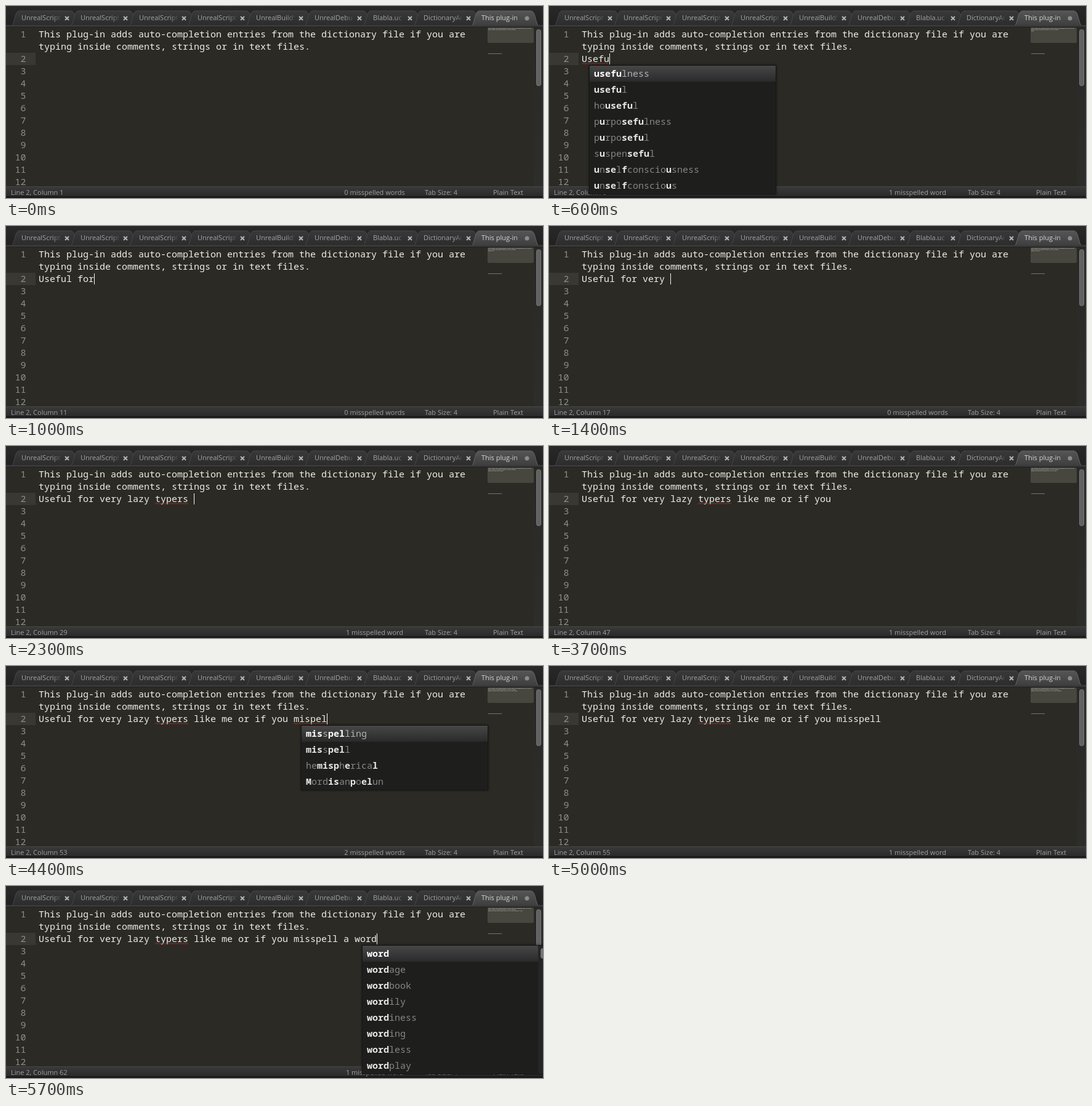
An HTML page with a canvas that plays this animation: 872 px wide and 312 px high, repeating every 5.8 s.

```html
<!DOCTYPE html>
<html lang="en">
<head>
<meta charset="utf-8">
<title>Dictionary completion</title>
<style>
html, body { margin: 0; width: 100%; height: 100%; overflow: hidden; background: #2b2a25; }
canvas { display: block; width: 872px; height: 312px; }
</style>
</head>
<body>
<canvas id="stage" width="872" height="312"></canvas>
<script>
const g = document.getElementById('stage').getContext('2d');
const W = 872, H = 312, LOOP = 5800, STEP = 100;
const CW = 9, LEFT = 53, ROW = 20;
const CODE = '15px "Noto Sans Mono", "DejaVu Sans Mono", monospace';
const UI = '11px "Open Sans", "Noto Sans", sans-serif';

const intro = [
  'This plug-in adds auto-completion entries from the dictionary file if you are',
  'typing inside comments, strings or in text files.'
];
const start = 'Useful for very lazy typers like me or if you ';
const typo = start + 'mispel';
const fixed = start + 'misspell a word';

// [step, typed length], typed evenly in between
const keys = [[1, 0], [6, 5], [14, 16], [15, 16], [23, 28], [24, 28], [35, 46], [38, 46], [44, 52]];
const fixKeys = [[47, 54], [49, 54], [57, 61]];

// Letters between asterisks are the matched ones
const lists = {
  Usefu: ['*usefu*lness', '*usefu*l', 'ho*usefu*l', 'p*u*rpo*sefu*lness', 'p*u*rpo*sefu*l',
    's*u*spen*sefu*l', '*u*n*se*l*f*conscio*u*sness', '*u*n*se*l*f*conscio*u*s'],
  mispel: ['*mis*s*pel*ling', '*mis*s*pel*l', 'he*misp*h*e*rica*l*', '*M*ord*is*an*p*o*el*un'],
  word: ['*word*', '*word*age', '*word*book', '*word*ily', '*word*iness', '*word*ing', '*word*less', '*word*play']
};
const unknown = /\b(Usefu?|ver|laz|typ|typers?|misp|mispel?)\b/g;

// [label, text x, close x]
const tabs = [
  ['UnrealScriptA', 25, 99], ['UnrealScriptB', 121, 194], ['UnrealScriptC', 216, 289],
  ['UnrealScriptD', 311, 384], ['UnrealBuildSy', 406, 479], ['UnrealDebugger', 501, 574],
  ['Blabla.uc', 596, 656], ['DictionaryAuto', 678, 751], ['This plug-in', 772, 846]
];

function vGrad(y0, y1, ...colors) {
  const p = g.createLinearGradient(0, y0, 0, y1);
  colors.forEach((c, i) => p.addColorStop(i / (colors.length - 1), c));
  return p;
}

function box(x, y, w, h, fill) {
  g.fillStyle = fill;
  g.fillRect(x, y, w, h);
}

function pill(x, y, w, h, r, fill) {
  g.fillStyle = fill;
  g.beginPath();
  g.roundRect(x, y, w, h, r);
  g.fill();
}

function text(s, x, y, fill, font = CODE, align = 'left') {
  g.font = font;
  g.textAlign = align;
  g.fillStyle = fill;
  g.fillText(s, x, y);
}

function lengthAt(list, n) {
  if (n <= list[0][0]) return list[0][1];
  for (let i = 1; i < list.length; i++) {
    const [a, from] = list[i - 1], [b, to] = list[i];
    if (n <= b) return from + Math.floor((to - from) * (n - a) / (b - a));
  }
  return list[list.length - 1][1];
}

function typed(n) {
  if (n < 0) return '';
  return n < 47 ? typo.slice(0, lengthAt(keys, n)) : fixed.slice(0, lengthAt(fixKeys, n));
}

function drawTab([label, x, close], active) {
  const l = x - 17, r = close + 20;
  g.beginPath();
  g.moveTo(l, 33);
  g.bezierCurveTo(l + 7, 30, l + 5, 8, l + 14, 8);
  g.lineTo(r - 14, 8);
  g.bezierCurveTo(r - 5, 8, r - 7, 30, r, 33);
  g.fillStyle = active ? vGrad(8, 33, '#555555', '#3d3d3d') : vGrad(8, 33, '#393939', '#2b2b2b');
  g.fill();
  g.strokeStyle = active ? '#666666' : '#484848';
  g.lineWidth = 1;
  g.stroke();

  const end = close - 11, color = active ? '#d6d6d6' : '#a2a2a2';
  const fade = g.createLinearGradient(end - 12, 0, end, 0);
  fade.addColorStop(0, color);
  fade.addColorStop(1, active ? '#b0b0b0' : '#a2a2a230');
  g.save();
  g.beginPath();
  g.rect(x - 1, 8, end - x + 1, 24);
  g.clip();
  text(label, x, 23, fade, UI);
  g.restore();

  if (active) {
    pill(close - 3.5, 16.5, 7, 7, 3.5, '#8b8b8b');
  } else {
    g.strokeStyle = '#b4b4b4';
    g.lineWidth = 2;
    g.beginPath();
    g.moveTo(close - 3, 17);
    g.lineTo(close + 3, 23);
    g.moveTo(close + 3, 17);
    g.lineTo(close - 3, 23);
    g.stroke();
  }
}

function drawTabs() {
  box(0, 0, W, 35, vGrad(0, 34, '#292929', '#202020'));
  tabs.forEach((t, i) => drawTab(t, i === tabs.length - 1));
  box(0, 31, W, 3, '#3b3b3b');
  box(0, 33, W, 1, '#323232');
  box(0, 34, W, 1, '#222220');
}

function miniLine(s, y) {
  g.fillStyle = 'rgba(205,205,195,.5)';
  [...s].forEach((c, i) => { if (c !== ' ') g.fillRect(783 + i * 0.91, y, 0.91, 1); });
}

function drawMinimap(line) {
  pill(782, 35, 75, 25, 2, '#47473f');
  miniLine(intro[0], 36);
  miniLine(intro[1], 38);
  miniLine(line, 40);
  box(783, 77, 22, 1, '#75756b');
  box(857, 35, 15, 258, vGrad(35, 293, '#292927', '#2d2d2b'));
  pill(861, 38, 8, 92, 4, '#777777');
  pill(862, 39, 6, 90, 3, '#616161');
}

function squiggle(x, w) {
  g.strokeStyle = '#d02020';
  g.lineWidth = 1;
  g.beginPath();
  g.moveTo(x, 94.5);
  for (let i = 2; i <= w; i += 2) g.lineTo(x + i, i % 4 ? 92.5 : 94.5);
  g.stroke();
}

function drawEditor(line, caret) {
  box(0, 35, W, 258, '#2b2a25');
  box(0, 76, 48, ROW, '#393833');
  text('1', 32.5, 51, '#8f908a', CODE, 'right');
  for (let n = 2; n <= 12; n++) text(n, 32.5, 91 + (n - 2) * ROW, '#8f908a', CODE, 'right');
  intro.forEach((s, i) => text(s, LEFT, 51 + i * ROW, '#eeeee6'));
  text(line, LEFT, 91, '#eeeee6');
  for (const m of line.matchAll(unknown)) squiggle(LEFT + m.index * CW, m[0].length * CW);
  if (caret) box(LEFT + line.length * CW, 77, 1, 18, '#f8f8f0');
}

function drawStatus(line) {
  const bad = [...line.matchAll(unknown)].length;
  box(0, 293, W, 19, vGrad(293, 310, '#3a3a3a', '#292929'));
  box(0, 293, W, 1, '#454545');
  box(0, 309, W, 3, '#1c1a1a');
  const label = (s, x, align) => text(s, x, 307, '#a0a0a0', UI, align);
  label('Line 2, Column ' + (line.length + 1), 8);
  label(bad + ' misspelled word' + (bad === 1 ? '' : 's'), 598.5, 'center');
  label('Tab Size: 4', 680);
  label('Plain Text', 791);
}

function drawItem(item, x, y, count, first) {
  let left = count;
  item.split('*').forEach((part, i) => {
    [...part].forEach(c => {
      const hit = i % 2 === 1 && left-- > 0;
      const color = first ? (hit ? '#ffffff' : '#b2b2b2') : (hit ? '#e6e6e6' : '#868686');
      text(c, x, y, color, hit ? 'bold ' + CODE : CODE);
      x += CW;
    });
  });
}

function drawPopup(line) {
  const word = line.slice(line.lastIndexOf(' ') + 1);
  if (word.length < 3) return;
  const key = Object.keys(lists).find(k => k.startsWith(word));
  if (!key) return;
  const items = lists[key], scroll = key === 'word';
  const x = LEFT + (line.length - word.length) * CW + 13;
  const w = 302, h = items.length * 26 + 2;
  g.save();
  g.shadowColor = 'rgba(0,0,0,.55)';
  g.shadowBlur = 4;
  box(x - 1, 96, w + 2, h, '#151515');
  g.restore();
  box(x, 97, w, h - 2, '#1e1f1d');
  const rowW = scroll ? 285 : w;
  box(x, 97, rowW, 26, vGrad(97, 123, '#464746', '#292a29'));
  if (scroll) {
    box(x + rowW, 97, w - rowW, h - 2, '#252525');
    pill(868, 101, 8, 17, 4, '#747474');
  }
  items.forEach((s, i) => drawItem(s, x + 7, 115 + i * 26, word.length, i === 0));
}

function draw(ms) {
  const n = Math.floor((ms % LOOP) / STEP), line = typed(n);
  const caret = n > 1 && (line !== typed(n - 1) || line !== typed(n - 2));
  g.clearRect(0, 0, W, H);
  drawEditor(line, caret);
  drawMinimap(line);
  drawTabs();
  drawStatus(line);
  drawPopup(line);
}

const begin = performance.now();
function tick(now) {
  draw(Math.max(0, now - begin));
  requestAnimationFrame(tick);
}
draw(0);
requestAnimationFrame(tick);
</script>
</body>
</html>
```
